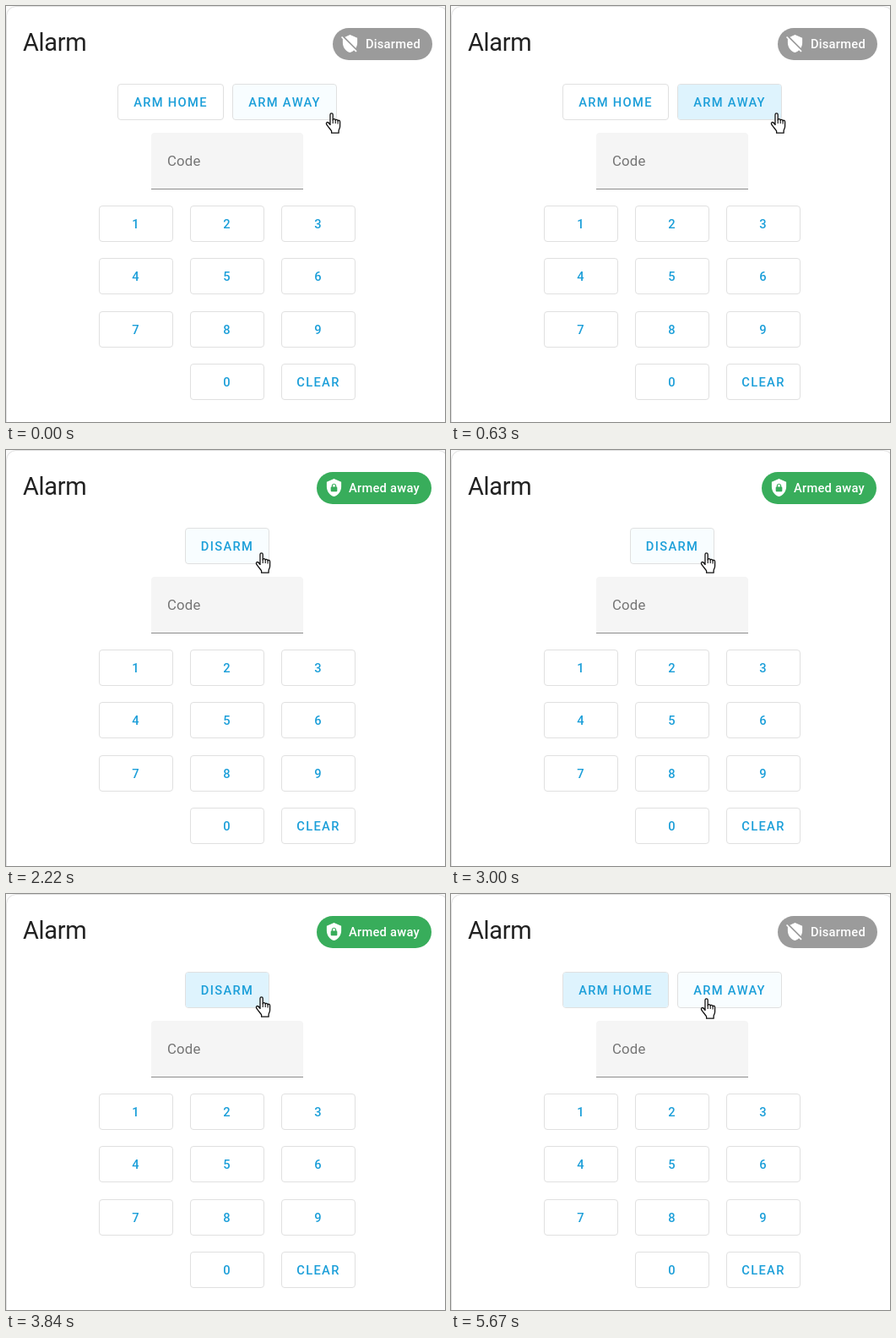
Write an HTML page that moves like this. It is 520 px wide and 492 px high and loops after 5.7 s.

```html
<!DOCTYPE html>
<html lang="en">
<head>
<meta charset="utf-8">
<title>Alarm panel</title>
<style>
  html, body { margin: 0; width: 100%; height: 100%; overflow: hidden; background: #fafafa; }
  body { position: relative; font-family: Roboto, sans-serif; }
  body * { position: absolute; box-sizing: border-box; white-space: nowrap; }
  .card { left: 0; top: 0; width: 524px; height: 520px; background: #fff; border: 1px solid #e0e0e0; border-radius: 12px; }
  .title { left: 20px; top: 23px; font-size: 29px; line-height: 40px; letter-spacing: -.35px; color: #212121; }
  .chip { top: 26px; height: 38px; border-radius: 19px; color: #fff; font-weight: 500; font-size: 14.7px; line-height: 38px; letter-spacing: .0178em; }
  .chip span { right: 14px; }
  .chip svg { top: 7px; width: 23px; height: 23px; fill: #fff; }
  .off { left: 387px; width: 118px; background: #9b9b9b; }
  .away { left: 368px; width: 136px; background: #38ad5b; }
  .off svg { left: 9px; }
  .away svg { left: 9px; }
  .field { left: 172px; top: 150px; width: 180px; height: 67px; background: #f5f5f5; border-bottom: 1px solid #8c8c8c; border-radius: 4px 4px 0 0; }
  .field span { left: 19px; top: 0; font-size: 16.8px; line-height: 66px; letter-spacing: .009em; color: #757575; }
  .btn { height: 43px; border: 1px solid #e0e0e0; border-radius: 4px; overflow: hidden; color: #1c9fd9; font-weight: 500; font-size: 14.7px; letter-spacing: .0893em; }
  .btn span { inset: 0; line-height: 42px; text-align: center; }
  .btn i { inset: 0; background: #def3fd; }
  .btn b { width: 260px; height: 260px; margin: -130px; border-radius: 50%; background: #def3fd; }
  .hand { left: 0; top: 0; width: 19px; height: 26px; overflow: visible; }
</style>
</head>
<body>
<div class="card"></div>
<div class="title">Alarm</div>
<div class="chip off">
  <svg viewBox="0 0 24 24"><path d="M1 4.27 2.28 3 20.5 21.22 19.23 22.5 16.8 20.07C15.45 21.5 13.79 22.53 12 23 6.84 21.74 3 16.55 3 11V6.27ZM12 1l9 4v6c0 2.28-.65 4.5-1.77 6.4L5.65 3.82Z"/></svg>
  <span>Disarmed</span>
</div>
<div class="chip away">
  <svg viewBox="0 0 24 24"><path fill-rule="evenodd" d="M12 1 3 5v6c0 5.55 3.84 10.74 9 12 5.16-1.26 9-6.45 9-12V5ZM12 7c1.4 0 2.8 1.1 2.8 2.5V11c.6 0 1.2.6 1.2 1.3v3.5c0 .6-.6 1.2-1.3 1.2H9.2C8.6 17 8 16.4 8 15.7v-3.5C8 11.6 8.6 11 9.2 11V9.5C9.2 8.1 10.6 7 12 7Zm0 1.2c-.8 0-1.5.5-1.5 1.3V11h3V9.5c0-.8-.7-1.3-1.5-1.3Z"/></svg>
  <span>Armed away</span>
</div>
<div class="field"><span>Code</span></div>
<svg class="hand" viewBox="0 0 19 26">
  <path fill="#fff" stroke="#111" stroke-width="1.3" stroke-linejoin="round" d="M6 15V2.6c0-2.4 3.2-2.4 3.2 0v6.2c.3-1.5 2.8-1.5 3 .4.5-1.3 2.7-1.1 2.9.6.7-1 2.5-.6 2.5 1.2v5.2c0 2.2-1.2 3.6-1.5 5.2v2.8H7.6v-2.3C6.400 20 4.200 17.600 2.600 15.300 1.200 13.600 1 12.300 2.100 11.700c1.400-.7 2.800.9 3.900 2.700"/>
  <path fill="none" stroke="#111" stroke-width="1.1" d="M9.200 8.500V13M12.200 9.200V13M15.100 9.800V13.500"/>
</svg>
<script>
const LOOP = 5700;
const ARMED = 1740, DISARMED = 5040;
const hand = document.querySelector('.hand');
const chips = { off: document.querySelector('.off'), away: document.querySelector('.away') };

function button(label, x, y, w) {
  const el = document.createElement('div');
  el.className = 'btn';
  el.style.cssText = `left:${x}px;top:${y}px;width:${w}px`;
  el.innerHTML = `<i style="opacity:0"></i><b style="opacity:0"></b><span>${label}</span>`;
  document.body.insertBefore(el, hand);
  return { el, tint: el.children[0], ripple: el.children[1], x, y };
}

['1', '2', '3', '4', '5', '6', '7', '8', '9', '', '0', 'CLEAR'].forEach((label, i) => {
  if (label) button(label, 110 + i % 3 * 108, Math.round(236 + Math.floor(i / 3) * 62.4), 88);
});
const home = button('ARM HOME', 132, 92, 126);
const away = button('ARM AWAY', 268, 92, 124);
const disarm = button('DISARM', 212, 92, 100);

// time, x, y of the pointer image
const path = [[0, 378, 126], [1770, 378, 126], [2220, 295, 121], [4020, 295, 121], [4080, 295, 123], [LOOP, 295, 123]];

const ramp = (t, from, len) => Math.min(1, Math.max(0, (t - from) / len));
const easeOut = p => 1 - (1 - p) ** 3;
const smooth = p => p * p * (3 - 2 * p);

function pointer(t) {
  const i = path.findIndex((p, n) => n && t < p[0]);
  const [a, b] = [path[i - 1], path[i]];
  const k = smooth(ramp(t, a[0], b[0] - a[0]));
  return [a[1] + (b[1] - a[1]) * k, a[2] + (b[2] - a[2]) * k];
}

function press(btn, t, at, hover, px, py) {
  btn.tint.style.opacity = Math.max(.22 * hover, ramp(t, at + 180, 120));
  btn.ripple.style.left = px - btn.x + 'px';
  btn.ripple.style.top = py - btn.y + 'px';
  btn.ripple.style.opacity = ramp(t, at, 75);
  btn.ripple.style.transform = `scale(${.1 + .9 * easeOut(ramp(t, at, 225))})`;
}

const show = (el, on) => el.style.visibility = on ? 'visible' : 'hidden';

function render(t) {
  const armed = t >= ARMED && t < DISARMED;
  const [x, y] = pointer(t);
  hand.style.transform = `translate(${x}px, ${y}px)`;
  show(chips.off, !armed);
  show(chips.away, armed);
  show(home.el, !armed);
  show(away.el, !armed);
  show(disarm.el, armed);
  home.tint.style.opacity = t >= DISARMED ? 1 : 0;
  if (t < DISARMED) press(away, t, 360, 1, 386, 128);
  else {
    away.tint.style.opacity = .22 * ramp(t, DISARMED, 60);
    away.ripple.style.opacity = 0;
  }
  press(disarm, t, 3600, ramp(t, 2130, 60), 303, 123);
}

const start = performance.now();
function tick() {
  render((performance.now() - start) % LOOP);
  requestAnimationFrame(tick);
}
tick();
</script>
</body>
</html>
```
